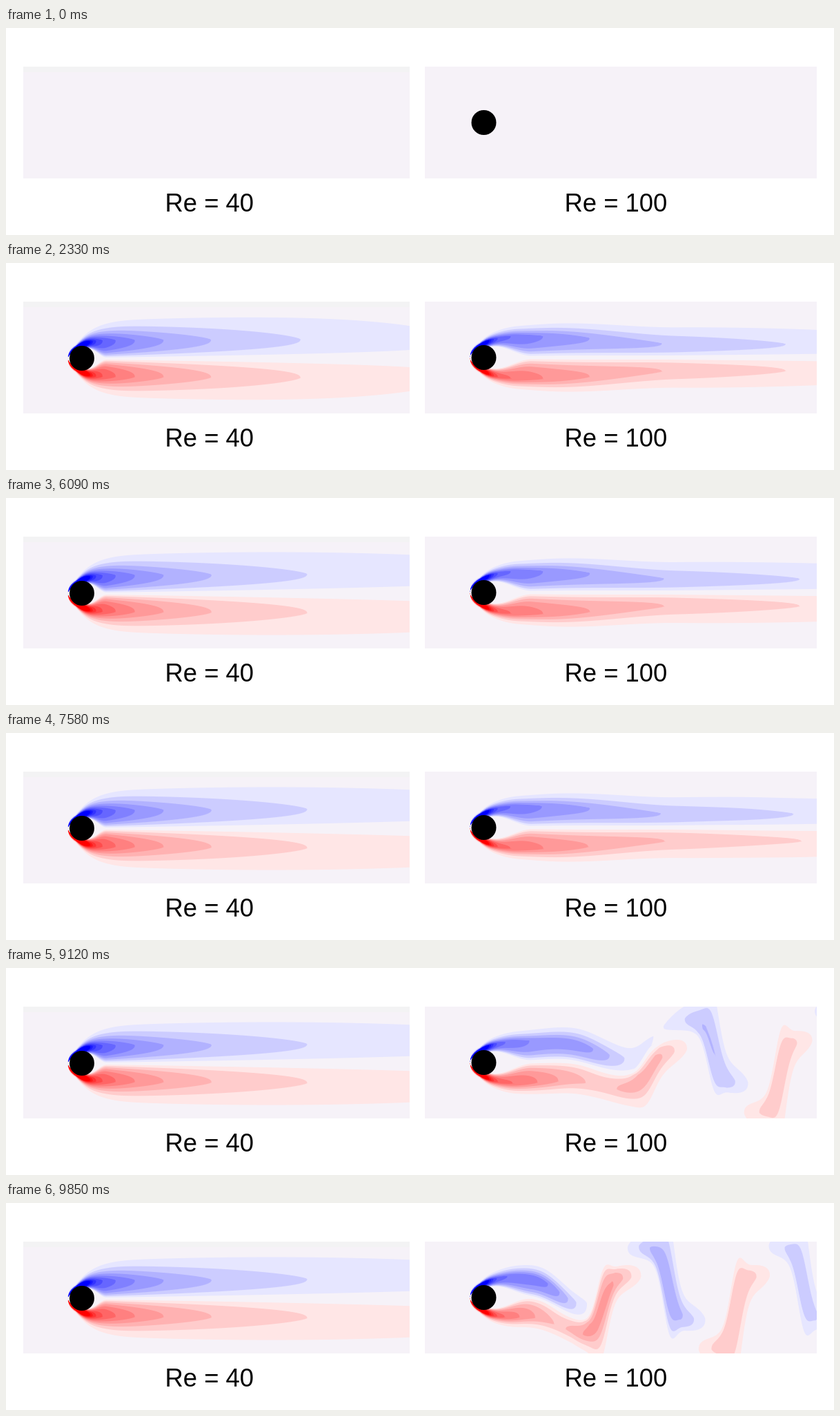
Animation of 1200x300 px, one loop 9.91 s. Source, as an HTML page with a canvas:

```html
<!DOCTYPE html>
<html lang="en">
<head>
<meta charset="utf-8">
<title>Flow past a cylinder</title>
<style>
  html, body { margin: 0; width: 100%; height: 100%; overflow: hidden; background: #fff; }
  canvas, svg { position: absolute; left: 0; top: 0; width: 1200px; height: 300px; }
  text { font: 36.4px "Liberation Sans", Arial, sans-serif; fill: #000; }
</style>
</head>
<body>
<canvas id="stage" width="1200" height="300"></canvas>
<svg viewBox="0 0 1200 300">
  <text x="230.5" y="266">Re = 40</text>
  <text x="809.5" y="266">Re = 100</text>
</svg>
<script>
const LOOP = 9910, STEP = 30, TOP = 56, HEIGHT = 162, R = 18;
const BASE = [246, 242, 248];
const ctx = document.getElementById('stage').getContext('2d');

const clamp = (v, lo, hi) => Math.min(hi, Math.max(lo, v));
const mix = (a, b, k) => a + (b - a) * k;
const smooth = (a, b, x) => {
  const k = clamp((x - a) / (b - a), 0, 1);
  return k * k * (3 - 2 * k);
};
const sigmoid = x => 1 / (1 + Math.exp(-x));

// s is the distance downstream of the cylinder centre
const panels = [
  {
    x: 25, width: 560, cx: 110, cy: 138, axis: 138.5, settle: 4200, strip: true, hideFirst: true,
    nose: 30, widen: 38, close: 36,
    strength: s => 1 / (.108 + .0012 * s),
    ridge: s => 26 + .007 * s,
    spread: s => 16 + .075 * s,
    front: t => .22 * t + 4e-5 * t * t, sharp: 4.5, thin: 0
  },
  {
    x: 607, width: 568, cx: 692.5, cy: 137, axis: 137, settle: LOOP, sheds: true,
    nose: 50, widen: 26, close: 70,
    strength: s => 1 / (.14 + .00068 * s + 2.3e-7 * s * s),
    ridge: s => 31 - 11 * smooth(90, 280, s),
    spread: s => 6.5 + .075 * s - 5.5e-5 * s * s,
    front: t => .42 * t + 6e-5 * t * t, sharp: 3, thin: .45
  }
];

for (const p of panels) {
  p.image = ctx.createImageData(p.width, HEIGHT);
  p.field = new Float32Array(p.width * HEIGHT);
}

// Travelling wave of the wake: its flanks steepen and hold one sign each as it rolls up
function wave(s, t) {
  const length = 195, tau = (t - 9120) / 1000;
  const onset = 108 + 125 * Math.exp(-tau / .378);
  const grow = Math.max(0, sigmoid(5 * (s / onset - 1)) - sigmoid(-5));
  const cycles = 1.95 + 1.948 * tau + .52 * tau * tau;
  const angle = 2 * Math.PI * (s / length - cycles);
  const sin = Math.sin(angle);
  const steep = .4 + 1.6 * grow, size = 54 * grow / Math.tanh(steep);
  const bend = Math.tanh(steep * Math.cos(angle));
  const slope = size * steep * (1 - bend * bend) * sin * 2 * Math.PI / length;
  const rolled = Math.pow(grow, .65);
  const share = c => mix(1, 1.25 * Math.pow((1 + c) / 2, 1.4), rolled);
  return { grow, shift: size * bend, stretch: Math.hypot(1, slope), blue: share(-sin), red: share(sin) };
}

const calm = { grow: 0, shift: 0, stretch: 1, blue: 1, red: 1 };

function layer(u, c) {
  const d = u - c.mid;
  if (d >= 0) return d > 6 * c.outer ? 0 : c.peak * Math.exp(-Math.pow(d / c.outer, 1.47));
  return -d < c.inner ? c.peak * (1 - Math.pow(-d / c.inner, 2.5)) : 0;
}

function fillField(p, t) {
  p.field.fill(0);
  if (t < STEP) return;
  const reach = p.front(t);
  for (let i = 0; i < p.width; i++) {
    const s = p.x + i + .5 - p.cx;
    if (s < -20) continue;
    const w = p.sheds ? wave(Math.max(s, 0), t) : calm;
    const front = 1 / (1 + Math.pow(Math.max(s, 0) / reach, p.sharp));
    const rise = s < p.nose ? Math.sqrt(1 - ((p.nose - s) / (p.nose + 20)) ** 2) : 1;
    const widen = 1 - Math.exp(-Math.pow((s + 20) / p.widen, 1.6));
    const mid = mix(p.ridge(s), 22, Math.min(1, 2 * w.grow)) * rise * (.5 + .5 * front);
    const c = {
      mid,
      peak: (p.strength(s) + 6 * Math.exp(-(((s + 5) / 16) ** 2))) * front,
      outer: Math.max(2, p.spread(s) * widen * (1 - p.thin + p.thin * front)) * w.stretch,
      inner: Math.max(1, mid * mix(.4, 1, smooth(8, p.close, s)) * w.stretch)
    };
    for (let j = 0; j < HEIGHT; j++) {
      const u = p.axis + w.shift - (TOP + j + .5);
      p.field[j * p.width + i] = w.blue * layer(u, c) - w.red * layer(-u, c);
    }
  }
}

// Flat colour bands with edges softened over about one pixel
function paintBands(p) {
  const { field, width, image } = p, px = image.data;
  for (let j = 0, k = 0; j < HEIGHT; j++) {
    for (let i = 0; i < width; i++, k++) {
      const v = field[k], m = Math.abs(v);
      const dx = (i + 1 < width ? field[k + 1] : field[k - 1]) - v;
      const dy = (j + 1 < HEIGHT ? field[k + width] : field[k - width]) - v;
      const edge = Math.max(1, Math.round(m));
      const soft = Math.max(.001, Math.hypot(dx, dy));
      const level = Math.min(10, edge - 1 + clamp((m - edge) / soft + .5, 0, 1));
      const tone = 255 - 25.5 * Math.max(1, level), near = Math.min(1, level);
      const base = p.strip && j < 8 ? [243, 243, 244] : BASE;
      px[4 * k] = mix(base[0], v > 0 ? tone : 255, near);
      px[4 * k + 1] = mix(base[1], tone, near);
      px[4 * k + 2] = mix(base[2], v > 0 ? 255 : tone, near);
      px[4 * k + 3] = 255;
    }
  }
}

function draw(p, time) {
  const t = Math.min(time, p.settle);
  if (t === p.last) return;
  p.last = t;
  fillField(p, t);
  paintBands(p);
  ctx.putImageData(p.image, p.x, TOP);
  if (p.hideFirst && t < STEP) return;
  ctx.fillStyle = '#000';
  ctx.beginPath();
  ctx.arc(p.cx, p.cy, R, 0, 2 * Math.PI);
  ctx.fill();
}

const start = performance.now();
function tick() {
  const t = (performance.now() - start) % LOOP;
  const stepped = Math.floor(t / STEP) * STEP;
  panels.forEach(p => draw(p, stepped));
  requestAnimationFrame(tick);
}
tick();
</script>
</body>
</html>
```
